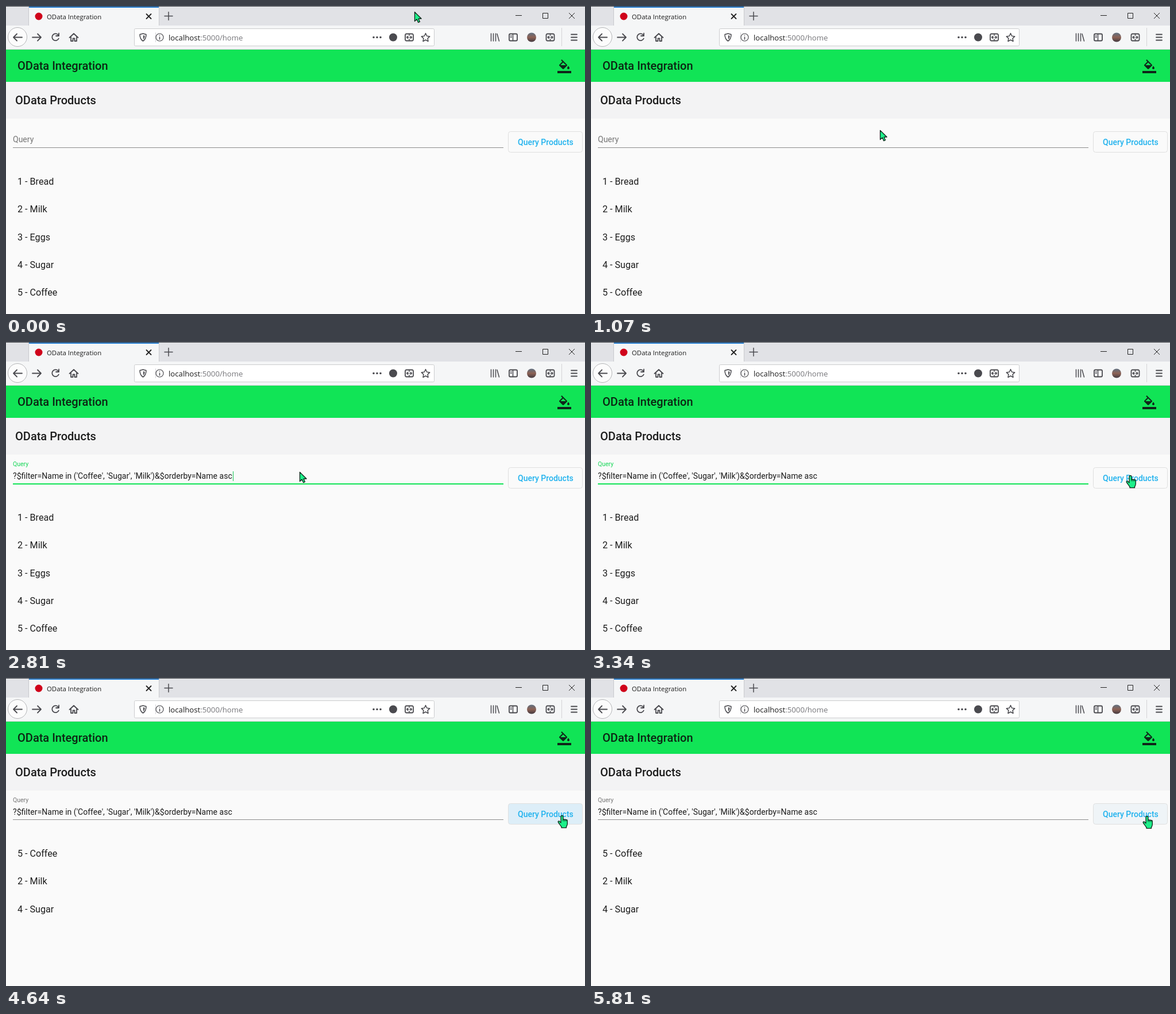
Recreate the animation shown at these times as an HTML page. Size 1008x536 px, loop 7.72 s.

```html
<!DOCTYPE html>
<html lang="en">
<head>
<meta charset="utf-8">
<title>OData Integration</title>
<style>
  html, body { margin: 0; width: 100%; height: 100%; overflow: hidden; background: #fafafa; }
  svg { display: block; width: 100%; height: 100%; }
  text { font-family: Roboto, sans-serif; fill: #1c1c1c; white-space: pre; }
  .ui { font-family: "Open Sans", sans-serif; }
  .title { font-size: 20px; font-weight: 500; }
  .icon { fill: none; stroke: #4a4a4f; stroke-width: 1.8; stroke-linecap: round; stroke-linejoin: round; }
  .thin { stroke: #222; stroke-width: 1; stroke-linecap: butt; }
  .pointer { fill: #1df08a; stroke: #10241a; stroke-width: 1.3; stroke-linejoin: round; }
</style>
</head>
<body>
<svg viewBox="0 0 1008 536">
  <defs>
    <linearGradient id="portrait" x2="0" y2="1">
      <stop stop-color="#607080"/><stop offset=".5" stop-color="#8d6255"/><stop offset="1" stop-color="#433a40"/>
    </linearGradient>
    <clipPath id="buttonClip"><rect x="874.5" y="218.5" width="129" height="36" rx="4"/></clipPath>
    <g id="resize">
      <rect x="-7" y="-6" width="14" height="12" rx="2"/>
      <path d="M-4.5 0H-1M1 0h3.500M-2.500-2-4.500 0l2 2M2.500-2l2 2-2 2M0-6v3M0 3v3" stroke-width="1.4"/>
    </g>
  </defs>

  <!-- Browser tabs -->
  <rect width="1008" height="35" fill="#e1e2e6"/>
  <rect y="34" width="1008" height="41" fill="#f5f6f7"/>
  <rect x="40" width="226" height="35" fill="#f5f6f7"/>
  <path d="M39.500 1v33M266.500 1v33" stroke="#c9cacd"/>
  <rect x="40" y="1" width="226" height="2" fill="#2a7fd0"/>
  <rect width="1008" height="1" fill="#45474b"/>
  <circle cx="57" cy="18" r="6.500" fill="#d0021b"/>
  <text class="ui" x="71" y="23" font-size="11.4">OData Integration</text>
  <g class="icon">
    <path d="M244.500 14l8 8m0-8l-8 8" stroke="#222"/>
    <path d="M276 17.500h14M283 10.500v14" stroke-width="1.500"/>
    <path class="thin" d="M887 16.500h11M934.500 12.500h9v9h-9zM980 12l10 10m0-10l-10 10"/>
  </g>

  <!-- Browser navigation -->
  <circle cx="20" cy="54" r="16.500" fill="#fcfcfc" stroke="#b4b5b7"/>
  <rect x="223.500" y="39.500" width="522" height="30" rx="2" fill="#fff" stroke="#cbccce"/>
  <path d="M260.500 46v17M967.500 38v32" stroke="#d4d4d7"/>
  <g class="icon">
    <path d="M28 54.500H13m6-6-6 6 6 6M46 54.500h15m-6-6 6 6-6 6"/>
    <path d="M91 50.500a6 6 0 1 0 .8 6M92 47.500v4.500h-5"/>
    <path d="M110.500 55l7.500-7 7.500 7M113 54v7h3.500v-4.500h3V61h3.500v-7"/>
    <path d="M238.500 48l5.500 1.500c0 6-1.500 9-5.500 11.500-4-2.500-5.500-5.500-5.500-11.500z" stroke-width="1.500"/>
    <path d="M239 51v7c2-1.500 2.500-4 2.500-6.300z" fill="#4a4a4f" stroke="none"/>
    <circle cx="267.500" cy="54.500" r="6.500" stroke-width="1.200"/>
    <path d="M267.500 54v4M267.500 51v.1" stroke-width="1.500"/>
    <path d="M640 54.500h.01M646 54.500h.01M652 54.500h.01" stroke-width="3.600"/>
    <use href="#resize" x="702" y="54.500"/>
    <path d="M730.500 47.500l2.200 4.700 5.100.7-3.700 3.500.9 5.100-4.500-2.500-4.500 2.500.9-5.100-3.700-3.500 5.100-.7z" stroke-width="1.500"/>
    <path d="M844.500 48v13M848.500 48v13M852.500 48v13M855 48.500l3.500 12.500" stroke-width="1.500"/>
    <rect x="876" y="48.500" width="14" height="12" rx="2"/>
    <path d="M882.500 49v11M878.500 52h1.500M878.500 54.500h1.500" stroke-width="1.500"/>
    <use href="#resize" x="947.500" y="54.500"/>
    <path d="M984 49.500h10M984 54.500h10M984 59.500h10"/>
  </g>
  <circle cx="674" cy="54.500" r="7" fill="#4a4a4f"/>
  <circle cx="915" cy="54.500" r="8" fill="url(#portrait)"/>
  <text class="ui" x="283" y="60" font-size="13.2">localhost<tspan fill="#77777b">:5000/home</tspan></text>

  <!-- Page -->
  <rect y="75" width="1008" height="1" fill="#cfd2d0"/>
  <rect y="76" width="1008" height="460" fill="#fafafa"/>
  <rect y="76" width="1008" height="56" fill="#11e456"/>
  <rect y="132" width="1008" height="64" fill="#f3f3f4"/>
  <text class="title" x="20" y="111" style="fill:#0c2513">OData Integration</text>
  <text class="title" x="16" y="171">OData Products</text>
  <path transform="translate(960 93)" fill="#10251a" d="M16.560 8.940L7.620 0 6.210 1.410l2.380 2.380-5.150 5.150c-.59.59-.59 1.540 0 2.120l5.500 5.500c.59.59 1.530.59 2.120 0l5.500-5.500c.59-.58.59-1.530 0-2.120zM5.210 10L10 5.210 14.790 10zM19 11.500s-2 2.170-2 3.500a2 2 0 0 0 4 0c0-1.330-2-3.500-2-3.500zM0 20h24v4H0z"/>

  <path d="M12 246.500h854" stroke="#8c8c8c"/>
  <path id="activeLine" d="M-427 247h854" stroke="#11e456" stroke-width="2"/>
  <text id="label" font-size="14">Query</text>
  <text id="query" x="12" y="238" font-size="14.06">?$filter=Name in ('Coffee', 'Sugar', 'Milk')&amp;$orderby=Name asc</text>
  <rect id="caret" y="225" width="1" height="17" fill="#13c653"/>

  <g clip-path="url(#buttonClip)">
    <rect id="hover" x="874" y="218" width="130" height="37" fill="#eff4f7"/>
    <circle id="ripple" cx="968" cy="241" fill="#29b6f6"/>
  </g>
  <rect x="874.500" y="218.500" width="129" height="36" rx="4" fill="none" stroke="#dfdfdf"/>
  <text x="891" y="241.500" font-size="14" font-weight="500" style="fill:#20b2ee">Query Products</text>

  <g id="list" font-size="16.15"></g>

  <g id="pointer" class="pointer">
    <path id="arrow" d="M.5.5v16l3.700-3.400 2.500 5.600 2.800-1.200-2.400-5.500h5z"/>
    <g id="hand">
      <path d="M-2 2C-2 0 2 0 2 2v6c0-1.700 2.600-1.400 2.600.2 0-1.500 2.500-1.200 2.500.3 0-1.300 2.200-1 2.200.6v5.400c0 3-1.300 4.200-1.800 5.500v1.700H-1V20c-1.500-1.600-3-4.300-5.300-7.500-1.500-2.100.7-3.400 2.200-1.800L-2 12.700z"/>
      <path d="M2 8v2.500M4.600 8.200v2.300M7.100 8.500v2" stroke-width=".9"/>
    </g>
  </g>
</svg>
<script>
const DURATION = 7720, FOCUS = 1845, PASTE = 2810, HOVER = 3610, PRESS = 4140, RESULTS = 4360;
const $ = id => document.getElementById(id);
const clamp = v => Math.max(0, Math.min(1, v));
const progress = (t, start, length) => clamp((t - start) / length);
const mix = (a, b, p) => a + (b - a) * p;
const show = (id, on) => $(id).setAttribute("visibility", on ? "visible" : "hidden");

// cubic-bezier(.25, .8, .25, 1), solved by bisection
function swift(x) {
  let low = 0, high = 1;
  for (let i = 0; i < 20; i++) {
    const s = (low + high) / 2;
    if (.75 * s * (1 - s) + s ** 3 < x) low = s; else high = s;
  }
  const r = 1 - low;
  return 2.4 * low * r * r + 3 * low * low * r + low ** 3;
}

// Pointer stops: time, x, y
const path = [
  [40, 711, 10], [1070, 503, 216], [1240, 504, 209], [1400, 504, 209], [1500, 507, 226],
  [1640, 507, 226], [1800, 511, 226], [2840, 511, 226], [3070, 700, 257], [3340, 939, 232],
  [3570, 955, 245], [3780, 964, 252], [3970, 968, 239], [5809, 968, 239], [5810, 968, 240]
];

function pointerAt(t) {
  const next = path.findIndex(stop => stop[0] > t);
  if (next < 0) return path.at(-1).slice(1);
  if (next === 0) return path[0].slice(1);
  const [t0, x0, y0] = path[next - 1], [t1, x1, y1] = path[next];
  const p = progress(t, t0, t1 - t0), eased = p * p * (3 - 2 * p);
  return [mix(x0, x1, eased), mix(y0, y1, eased)].map(Math.round);
}

const products = ["1 - Bread", "2 - Milk", "3 - Eggs", "4 - Sugar", "5 - Coffee"];
const results = ["5 - Coffee", "2 - Milk", "4 - Sugar"];
let shownItems;

function showItems(items) {
  if (items === shownItems) return;
  shownItems = items;
  $("list").innerHTML = items
    .map((item, i) => `<text x="20" y="${311 + Math.round(i * 48.25)}">${item}</text>`).join("");
}

function render(t) {
  const focused = t >= FOCUS && t < PRESS, pasted = t >= PASTE;

  const float = swift(progress(t, FOCUS, 400));
  $("label").setAttribute("transform", `translate(12 ${mix(237, 216, float)}) scale(${mix(1, .75, float)})`);
  $("label").style.fill = focused ? "#13d655" : "#757575";

  const stretch = mix(.5, 1, swift(progress(t, FOCUS, 300)));
  $("activeLine").setAttribute("transform", `translate(439 0) scale(${stretch} 1)`);
  $("activeLine").setAttribute("opacity", focused ? progress(t, FOCUS, 100) : 0);

  show("query", pasted);
  const blinkStart = pasted ? PASTE : FOCUS;
  show("caret", focused && (t - blinkStart) % 1000 < 500);
  $("caret").setAttribute("x", pasted ? 395 : 12);

  $("hover").setAttribute("opacity", progress(t, HOVER, 200));
  const grow = 1 - (1 - progress(t, PRESS, 450)) ** 3;
  $("ripple").setAttribute("r", 98 * grow);
  $("ripple").setAttribute("opacity", .11 * (1 - progress(t, PRESS + 450, 400)));

  showItems(t < RESULTS ? products : results);

  const [x, y] = pointerAt(t);
  const onButton = x >= 874 && y > 218;
  $("pointer").setAttribute("transform", `translate(${x} ${y})`);
  show("arrow", !onButton);
  show("hand", onButton);
}

function tick() {
  render(performance.now() % DURATION);
  requestAnimationFrame(tick);
}
tick();
</script>
</body>
</html>
```
